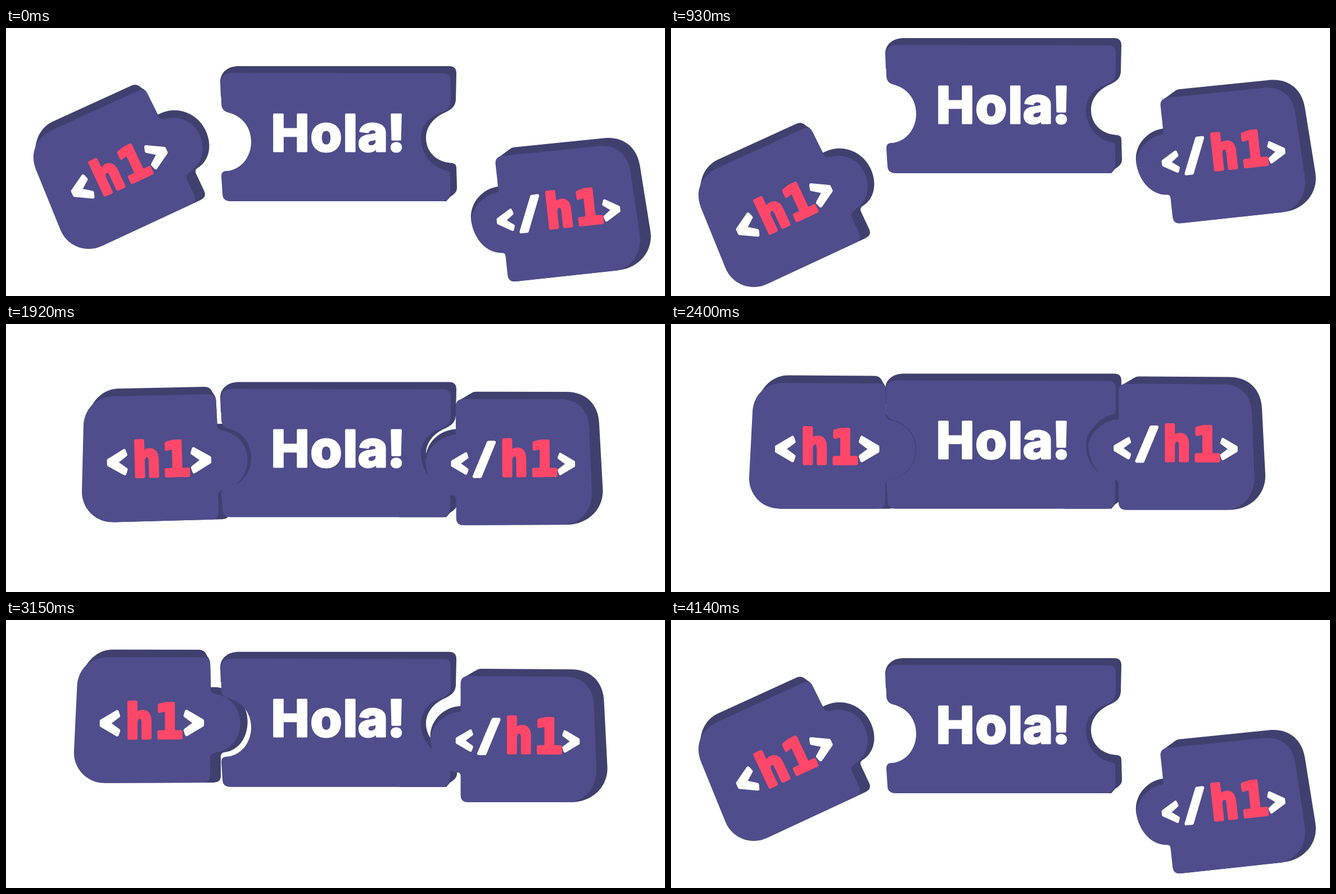
An HTML page with a canvas for the animation above (4.2 s loop, 1172 px wide and 478 px high).

```html
<!DOCTYPE html>
<html lang="es">
<head>
<meta charset="utf-8">
<title>Hola!</title>
<style>
html, body { margin: 0; width: 100%; height: 100%; overflow: hidden; background: #fff; }
canvas { display: block; width: 100%; height: 100%; }
</style>
</head>
<body>
<canvas id="stage" aria-label="&lt;h1&gt;Hola!&lt;/h1&gt;"></canvas>
<script>
const W = 1172, H = 478, LOOP = 4200, STEP = 30, LAST = 4140;
const FACE = '#4f4d8b', SIDE = '#40406f', PINK = '#ff4769', WHITE = '#fff';
const MONO = '700 84px "DejaVu Sans Mono", monospace';
const SANS = '800 91px Inter, sans-serif';

const canvas = document.getElementById('stage');
const ctx = canvas.getContext('2d');
const dpr = window.devicePixelRatio || 1;
canvas.width = W * dpr;
canvas.height = H * dpr;

// Each track is a list of [time, value] keys, eased in and out between keys.
const tracks = {
  leftX: [[0, 147], [1285, 147], [2060, 193], [2850, 193], [3550, 147]],
  leftY: [[0, 340], [930, 408], [1855, 300], [3140, 236.7], [4140, 340]],
  leftTurn: [[0, -25], [1200, -25], [2050, 0], [3100, 0], [3970, -25]],
  midY: [[0, 0], [1130, -54.5], [1165, -54.5], [2050, 41], [2880, -12.7], [4140, 0]],
  rightX: [[0, 905], [1010, 905], [2060, 809], [2860, 809], [4140, 905]],
  rightY: [[0, 439], [800, 335], [2000, 346], [2740, 297], [2930, 297], [4030, 441.5], [4140, 439]],
  rightTurn: [[0, -6.2], [960, -6.2], [2050, 0], [3130, 0], [4120, -6.2]]
};

function at(name, t) {
  const keys = tracks[name];
  const i = keys.findIndex(k => k[0] > t);
  if (i < 0) return keys[keys.length - 1][1];
  const [t0, a] = keys[i - 1], [t1, b] = keys[i];
  const u = (t - t0) / (t1 - t0);
  return a + (b - a) * u * u * (3 - 2 * u);
}

const left = {
  side: new Path2D(`M-40,-138 C-30,-168 -8,-184 15,-184 L168,-183 C178,-183 181,-178 184,-171
    C188,-166 189,-162 189,-156 L190,-116 C226,-119 255,-90 255,-55 C255,-25 238,-3 214,0
    C208,1 207,4 207,10 L207,42 C207,50 203,54 194,54 L0,54 Z`),
  face: new Path2D(`M0,54 A54,54 0 0 1 -54,-3 L-48,-119 C-46,-150 -24,-170.5 8,-170.5
    L176,-169.5 C185,-169.5 189,-165 189,-156 L189.5,-112 C190,-104 199,-104 206,-102
    C228,-95 242,-76 242,-52 C242,-28 228,-7 205,-1 C195,1 188,2 188,11 L188,40
    C188,49 184,54 175,54 Z`)
};

const mid = {
  side: new Path2D(`M382,122 L381,95 C382,78 395,68 415,68 L788,68 Q801,68 801,81 L800,126
    C800,141 790,147 776,153 C757,163 747,179 747,196 C747,222 767,240 794,241
    Q801,242 801,249 L802,284 C802,292 799,295 790,301 L783,309 L700,309 Z`),
  face: new Path2D(`M402,80 L779,81 C788,81 791,87 791,94 L791,130 C790,142 784,147 774,151
    C752,158 738,174 738,196 C738,225 758,250 784,254 C790,255 790,259 790,264
    L790,293 C789,302 784,309 775,309 L399,309 C390,309 385,304 385,296 L383,265
    C383,257 387,255 393,255 C418,253 436,230 436,203 C436,177 420,157 396,151
    C387,149 383,143 383,135 L382,98 C382,86 390,80 402,80 Z`)
};

const right = {
  side: new Path2D(`M-10,-208 L14,-222 Q18,-225 23,-225 L183,-224 C220,-224 241,-200 242,-167
    L248,-49 C249,-15 222,13 183,13 L0,13 L-13,-100 L-30,-75 L-66,-95 L-67,-106
    C-66,-133 -44,-157 -13,-158.5 Z`),
  face: new Path2D(`M0,13 Q-13,13 -13,0 L-13,-33 Q-13,-40 -18,-40 C-46,-42 -66,-70 -67,-103
    C-61,-128 -42,-145 -13,-149 L-13,-199 C-13,-207 -8,-212 0,-212 L176,-211
    C206,-209 223,-189 224,-161 L228.5,-46 C229,-15 211,9 181,13 Z`)
};

function body(part) {
  ctx.fillStyle = SIDE;
  ctx.fill(part.side);
  ctx.fillStyle = FACE;
  ctx.fill(part.face);
}

function ink(color, weight) {
  ctx.fillStyle = ctx.strokeStyle = color;
  ctx.lineWidth = weight;
}

function glyphs(font, color, weight, baseline, letters) {
  ctx.font = font;
  ink(color, weight);
  for (const [ch, x] of letters) {
    ctx.fillText(ch, x, baseline);
    ctx.strokeText(ch, x, baseline);
  }
}

function poly(points) {
  ctx.beginPath();
  points.forEach(([x, y]) => ctx.lineTo(x, y));
  ctx.closePath();
  ctx.fill();
  ctx.stroke();
}

function chevron(x, y, size, dir) {
  ctx.save();
  ctx.translate(x, y);
  ctx.scale(size * dir, size);
  ink(WHITE, 6);
  poly([[-15, -4], [13, -20.5], [15.5, -13], [-2, 0], [15.5, 13], [13, 20.5], [-15, 4]]);
  ctx.restore();
}

function piece(x, y, turn, draw) {
  ctx.save();
  ctx.translate(x, y);
  ctx.rotate(turn * Math.PI / 180);
  draw();
  ctx.restore();
}

function drawLeft() {
  body(left);
  chevron(10, -52.5, 1, 1);
  glyphs(MONO, PINK, 6, -26, [['h', 62.5], ['1', 115]]);
  chevron(159.5, -52.5, 1, -1);
}

function drawMid() {
  body(mid);
  glyphs(SANS, WHITE, 3, 219.5, [['H', 505.5], ['o', 569.5], ['l', 612.5], ['a', 652.5], ['!', 694]]);
}

function drawRight() {
  body(right);
  chevron(-6.5, -97, 0.85, 1);
  ink(WHITE, 6);
  poly([[45, -134.5], [55, -134.5], [30, -74], [19.5, -74]]);
  glyphs(MONO, PINK, 6, -75, [['h', 90.5], ['1', 143]]);
  chevron(183.5, -95.5, 0.85, -1);
}

function render(t) {
  ctx.setTransform(dpr, 0, 0, dpr, 0, 0);
  ctx.fillStyle = WHITE;
  ctx.fillRect(0, 0, W, H);
  ctx.textAlign = 'center';
  ctx.lineJoin = 'round';
  piece(at('leftX', t), at('leftY', t), at('leftTurn', t), drawLeft);
  piece(0, at('midY', t), 0, drawMid);
  piece(at('rightX', t), at('rightY', t), at('rightTurn', t), drawRight);
}

let start;
function tick(now) {
  start ??= now;
  const t = (now - start) % LOOP;
  render(Math.min(Math.floor(t / STEP) * STEP, LAST));
  requestAnimationFrame(tick);
}
render(0);
requestAnimationFrame(tick);
</script>
</body>
</html>
```
